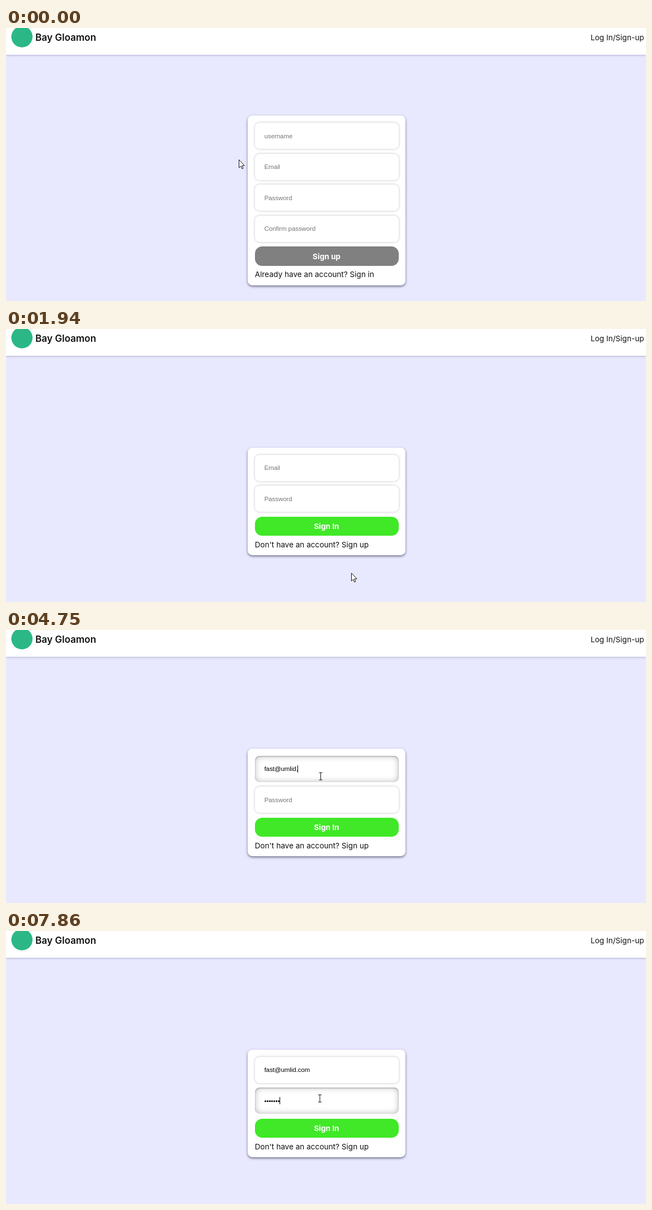
These frames come from a looping animation (1144 px wide and 490 px high, 7990 ms). An HTML page:

```html
<!DOCTYPE html>
<html lang="en">
<head>
<meta charset="utf-8">
<title>Sign in form</title>
<style>
  html, body { margin: 0; width: 100%; height: 100%; overflow: hidden; background: #e8e8fe; }
  div, svg { position: absolute; }
  svg { left: 0; top: 0; width: 1144px; height: 490px; }
  text { font: 13.6px Inter, sans-serif; fill: #111; white-space: pre; }
  .header { left: 0; top: 0; width: 1144px; height: 47.6px; background: #fff; box-shadow: 0 1px 4px rgba(60, 60, 120, .32); }
  .brand { font-size: 17px; font-weight: 600; }
  .card { left: 432.2px; width: 282.2px; border-radius: 8.5px; background: #fff; box-shadow: 0 2px 4px rgba(30, 30, 60, .6); }
  .field, .button { left: 445px; width: 256.6px; }
  .field { height: 47.1px; border-radius: 8.5px; background: #fff; box-shadow: 0 0 4px rgba(0, 0, 0, .25); }
  .field.focus { box-shadow: inset 0 0 12px rgba(0, 0, 0, .28), inset 0 1px 2px rgba(0, 0, 0, .3); }
  .button { height: 34.4px; border-radius: 13px; }
  .label { font-weight: 700; fill: #fff; text-anchor: middle; }
  .input { font: 11.36px "Liberation Sans", Arial, sans-serif; fill: #000; }
  .hint { fill: #757575; }
</style>
</head>
<body>
<div class="header"></div>
<svg>
  <circle cx="28.5" cy="15.8" r="19" fill="#2bb886"/>
  <text class="brand" x="52.6" y="23">Bay Gloamon</text>
  <text x="1140.6" y="22.2" text-anchor="end">Log In/Sign-up</text>
</svg>
<script>
const LOOP = 7990, PITCH = 55.6, TOP = 170, SWITCH = 1940;
const EMAIL = "fast@umlid.com", SECRET = "•••••••";
const emailKeys = [3010, 3270, 3420, 3550, 3820, 4090, 4150, 4290, 4350, 4550, 4750, 4880, 5010, 5080];
const secretKeys = [6710, 6910, 7110, 7260, 7330, 7590, 7860];
const carets = [[2410, 2940], [3010, 5630], [6180, LOOP]];
const clicks = [[1800, SWITCH, 617, 444.5], [2410, 2480, 562, 262], [6310, 6380, 561, 300]];
// Mouse moves: start, time per step, steps, end point
const moves = [
  [500, 70, 2, 456, 263],
  [780, 69, 11, 618.5, 445.5],
  [SWITCH, 70, 1, 617.5, 438],
  [2010, 70, 3, 562.5, 262.5],
  [5830, 70, 5, 561, 300.5]
];

function addPage(first, hints, label, color, link) {
  const rowY = i => TOP + PITCH * i;
  const end = first + hints.length;
  const page = document.createElement("div");
  page.innerHTML =
    `<div class="card" style="top:${rowY(first) - 12.8}px;height:${PITCH * hints.length + 82}px"></div>` +
    hints.map((_, i) => `<div class="field" style="top:${rowY(first + i)}px"></div>`).join("") +
    `<div class="button" style="top:${rowY(end)}px;background:${color}"></div><svg>` +
    hints.map((h, i) => `<text class="input hint" x="461.7" y="${rowY(first + i) + 27.6}">${h}</text>`).join("") +
    `<text class="label" x="573" y="${rowY(end) + 22.6}">${label}</text>` +
    `<text x="444.8" y="${rowY(end) + 55}">${link}</text></svg>`;
  document.body.append(page);
  return { page, first, end };
}

const signUp = addPage(0, ["username", "Email", "Password", "Confirm password"],
  "Sign up", "#808080", "Already have an account? Sign in");
const signIn = addPage(1, ["Email", "Password"],
  "Sign In", "#40e827", "Don't have an account? Sign up");

document.body.insertAdjacentHTML("beforeend", `<svg>
  <rect id="caret" width="1" height="13"/>
  <circle id="click" r="10" fill="#fafa46" opacity=".82"/>
  <g id="mouse" stroke="#111">
    <path id="arrow" fill="#fff" d="M0 0V14.3L3.3 11.3L5.4 16.2L7.5 15.3L5.4 10.5H9.7Z"/>
    <path id="beam" fill="none" d="M-3-6.5H3M0-6.5V6.5M-3 6.5H3"/>
  </g></svg>`);
const $ = id => document.getElementById(id);
const fields = signIn.page.querySelectorAll(".field");
const inputs = signIn.page.querySelectorAll(".input");

const show = (el, on) => { el.style.display = on ? "" : "none"; };
const during = (t, [from, to]) => t >= from && t < to;

function mouseAt(t) {
  let x = 416.5, y = 236.5;
  for (const [start, gap, steps, tx, ty] of moves) {
    if (t < start) break;
    const k = Math.min(Math.floor((t - start) / gap) + 1, steps) / steps;
    const e = k * k * (3 - 2 * k);
    x += (tx - x) * e;
    y += (ty - y) * e;
  }
  return [x, y];
}

// The text cursor appears over inputs and over the link line.
function overText(x, y, { first, end }) {
  const row = (y - TOP) / PITCH, i = Math.floor(row);
  if (x < 445 || x > 701) return false;
  if (i >= first && i < end) return (row - i) * PITCH < 47;
  const linkY = y - TOP - PITCH * end;
  return x < 658 && linkY > 42 && linkY < 60;
}

function type(el, keys, value, hint, t) {
  const n = keys.filter(k => t >= k).length;
  el.textContent = n ? value.slice(0, n) : hint;
  el.classList.toggle("hint", !n);
  return n ? el.getComputedTextLength() : 0;
}

function draw(now) {
  const t = now % LOOP;
  const active = t < SWITCH ? signUp : signIn;
  show(signUp.page, active === signUp);
  show(signIn.page, active === signIn);

  const focus = t < 2410 ? -1 : t < 6310 ? 0 : 1;
  fields.forEach((f, i) => f.classList.toggle("focus", i === focus));
  const widths = [
    type(inputs[0], emailKeys, EMAIL, "Email", t),
    type(inputs[1], secretKeys, SECRET, "Password", t)
  ];
  show($("caret"), carets.some(c => during(t, c)));
  if (focus >= 0) {
    $("caret").setAttribute("x", Math.floor(461.7 + widths[focus]));
    $("caret").setAttribute("y", focus ? 298 : 243);
  }

  const click = clicks.find(c => during(t, c));
  show($("click"), click);
  if (click) $("click").setAttribute("transform", `translate(${click[2]} ${click[3]})`);

  const [x, y] = mouseAt(t), text = overText(x, y, active);
  $("mouse").setAttribute("transform", `translate(${x} ${y})`);
  show($("beam"), text);
  show($("arrow"), !text);
}

const begin = performance.now();
function tick() {
  draw(performance.now() - begin);
  requestAnimationFrame(tick);
}
tick();
</script>
</body>
</html>
```
